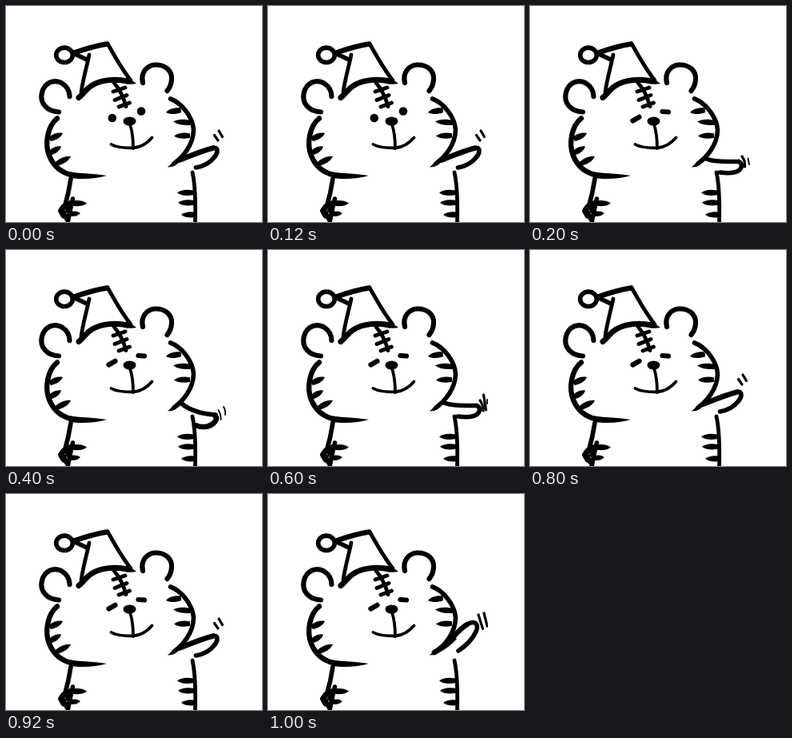
Write an HTML page without scripts that moves like this. It is 320 by 270 pixels and loops after 1200 ms.

```html
<!DOCTYPE html>
<html lang="en">
<head>
<meta charset="utf-8">
<title>Waving tiger</title>
<style>
  html, body { margin: 0; width: 100%; height: 100%; overflow: hidden; background: #fff; }
  svg { display: block; width: 100%; height: 100%; }
  .ink { fill: none; stroke: #000; stroke-width: 5.6; stroke-linecap: round; stroke-linejoin: round; }
  .fill { fill: #000; stroke: none; }
  .thin { stroke-width: 3.8; }
  .mid { stroke-width: 4.8; }
  .bold { stroke-width: 6.6; }
  .dash { stroke-width: 3.2; }
  .faint { stroke-width: 1.8; }

  /* Every pose switches hard on a 200 ms beat */
  .pose { visibility: hidden; animation: 1.2s step-end infinite; }
  .open { animation-name: open; }
  .shut { animation-name: shut; }
  .raised { animation-name: raised; }
  .level { animation-name: level; }
  .flick-a { animation-name: flick-a; }
  .flick-b { animation-name: flick-b; }
  .low { animation-name: low; }
  .high { animation-name: high; }
  @keyframes open { 0% { visibility: visible } 16.667%, 100% { visibility: hidden } }
  @keyframes shut { 0% { visibility: hidden } 16.667%, 100% { visibility: visible } }
  @keyframes raised { 0%, 66.667% { visibility: visible } 16.667%, 83.333%, 100% { visibility: hidden } }
  @keyframes level { 0%, 33.333%, 66.667%, 100% { visibility: hidden } 16.667%, 50% { visibility: visible } }
  @keyframes flick-a { 0%, 33.333%, 100% { visibility: hidden } 16.667% { visibility: visible } }
  @keyframes low { 0%, 50%, 100% { visibility: hidden } 33.333% { visibility: visible } }
  @keyframes flick-b { 0%, 66.667%, 100% { visibility: hidden } 50% { visibility: visible } }
  @keyframes high { 0% { visibility: hidden } 83.333%, 100% { visibility: visible } }
</style>
</head>
<body>
<svg viewBox="0 0 320 270" preserveAspectRatio="none">
  <defs>
    <!-- Tapered stripe, tip at the origin -->
    <path id="stripe" class="fill" d="M0 0C5-4 12-4.500 20-3V2.700C12 4.300 5 3.500 0 0Z"/>
    <clipPath id="edge"><path d="M0 0H275V270H0Z"/></clipPath>
  </defs>

  <g class="ink">
    <!-- Hat -->
    <ellipse cx="73" cy="61.3" rx="10.3" ry="9.2"/>
    <path class="bold" d="M85 58.5C98 54 113 49.5 126 47.500"/>
    <path class="mid" d="M127 47C135 61 144 78 156 93M104 61C101 76 96 92 94 108"/>
    <path d="M86 60L101 67"/>
    <path style="stroke-width:7" d="M91 114.500C98 109 99 104 107 99.500C119 92 137 90.500 152 94"/>
    <path class="fill" d="M150 90.500C155 92 160 94 163 97C158 98 154 98 149 97Z"/>

    <!-- Ears -->
    <path style="stroke-width:6.2" d="M66 132.500C51 132 42 121 44.800 109C48 95 61 91 70 96.500C77 101 79.500 107 79.500 113"/>
    <path style="stroke-width:6.2" d="M171 96C168 83 176 74.500 186 73.500C199 73 208 81 207 92C206.500 99 204 103 201.500 106"/>

    <!-- Face -->
    <path style="stroke-width:6.4" d="M64 140.500C52 150 48 172 54 187C60 202 70 209 84 211.500"/>
    <path class="fill" d="M80 207.500C95 209.500 110 209.500 126 212C112 216 95 217.500 79 214.500Z"/>
    <path d="M205.500 116C219 121 233.500 138 234.500 155C234 174 221 189 210 197"/>
    <path class="fill" d="M213 191L202 201.500L208 201L217 195Z"/>
    <use href="#stripe" transform="translate(71 159) rotate(156) scale(.9 1)"/>
    <use href="#stripe" transform="translate(69 175.500) rotate(150) scale(.82 1)"/>
    <use href="#stripe" transform="translate(81 188) rotate(153)"/>
    <use href="#stripe" transform="translate(200 133) rotate(-8) scale(.95 1)"/>
    <use href="#stripe" transform="translate(209 144.500) rotate(4) scale(1.15 1)"/>
    <use href="#stripe" transform="translate(210 162.500) rotate(-1)"/>

    <!-- Forehead -->
    <path class="mid" d="M135 96C142 104 147 114 150 125.500M134 107L149 102M136 117.500L151 111.500M141 126L154.500 121"/>

    <!-- Nose and mouth -->
    <ellipse class="fill" cx="154.5" cy="144" rx="8" ry="5.5"/>
    <path class="thin" d="M155 148C158 157 159 168 159 178M131.500 173C138 177 150 177.500 159 177.500C170 176.500 177 171 182.500 164.500"/>

    <!-- Body -->
    <path d="M81 216C79 230 76 242 73 252"/>
    <path style="stroke-width:7" d="M72 251L68.500 256L72 262"/>
    <path d="M72 258L75.500 266M83.500 241C81 250 79 261 77 271M79.500 246L77 256"/>
    <use href="#stripe" transform="translate(101 246.500) rotate(180)"/>
    <use href="#stripe" transform="translate(93 259) rotate(176) scale(.75 .9)"/>
    <path class="mid" d="M233 208C237 225 237 250 236.500 271"/>
    <use href="#stripe" transform="translate(214 233.500)"/>
    <use href="#stripe" transform="translate(215 246)"/>
    <use href="#stripe" transform="translate(219 261)"/>
  </g>

  <!-- Eyes -->
  <g class="pose open">
    <circle cx="132.800" cy="140" r="5.300"/>
    <circle cx="169" cy="131.500" r="5.300"/>
  </g>
  <path class="ink pose shut" style="stroke-width:6.2" d="M128.500 143.500L136.500 138.800M165.500 132L173 132.500"/>

  <!-- Waving arm -->
  <g class="ink" clip-path="url(#edge)">
    <g class="pose raised">
      <path class="bold" d="M217 192.500C231 187 245 181 259 177.500"/>
      <path d="M259 177.500C266 176 265 184 260 189.500C254 197 246 200.500 237.500 202"/>
      <path class="dash" d="M260.500 161.500L265 168M266 156L270.500 163.500"/>
    </g>
    <g class="pose level">
      <path d="M219 190.500C229 195 245 194.500 261 194.500"/>
      <path d="M261 194.500C267 197 265 205 257 207.500C250 209.500 244 209 237.500 208"/>
    </g>
    <g class="pose flick-a">
      <path class="dash" d="M265 188C268 192 269 196 268.500 201"/>
      <path class="faint" d="M272.500 190.500L274 198"/>
    </g>
    <g class="pose flick-b">
      <path class="dash" d="M265 188C268 192 269 196 269 201M269.500 181L272.500 200"/>
      <path class="faint" d="M274 187V192"/>
    </g>
    <g class="pose low">
      <path d="M219 191.500C229 200 245 205 262 206"/>
      <path class="bold" d="M261 206.500C266 211 260 218.500 252 220.500C246 221.500 241 221 238.500 219.500"/>
      <path class="faint" d="M265.500 200C268 204 269 208 268.500 212M272 196C274 199 274.500 202 274 206"/>
    </g>
    <g class="pose high">
      <path class="bold" d="M208 198C226 189 235 171 249 163"/>
      <path class="fill" d="M203 201C216 191 223 184 231 176L236 181C225 193 215 199 203 201Z"/>
      <path d="M249 163C259 157 264 163 260 172C255 183 247 190 238 196"/>
      <path class="dash" d="M263 151L268.500 168.500M270 149L274 165"/>
    </g>
  </g>
</svg>
</body>
</html>
```
